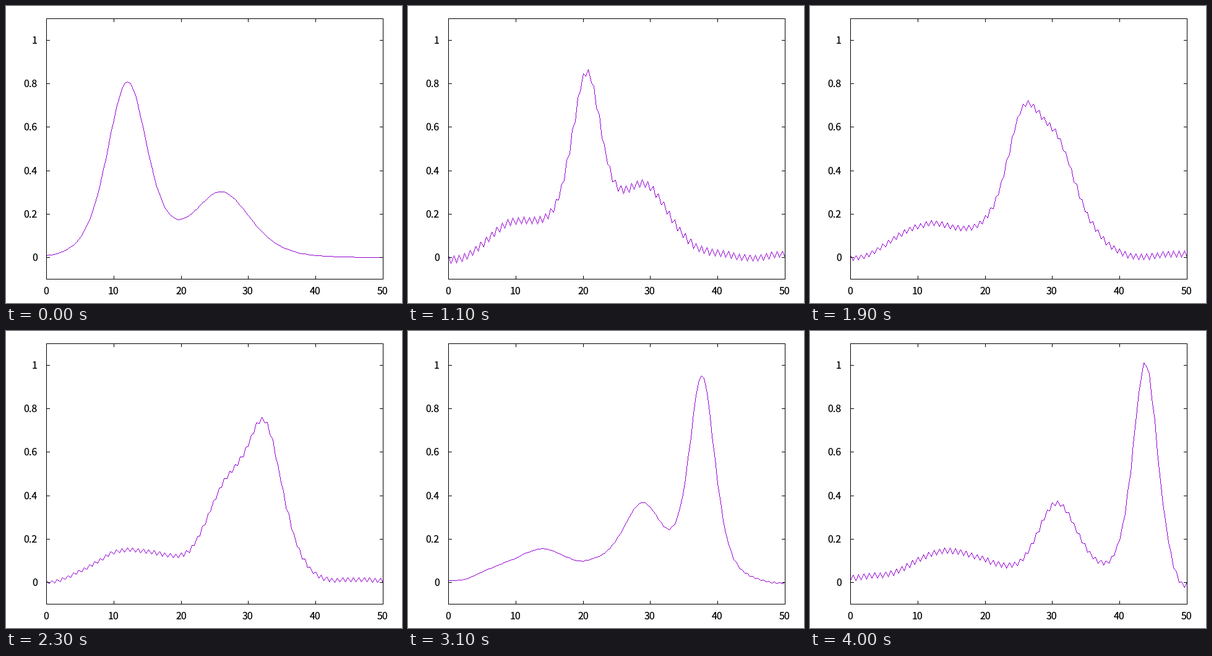
Recreate the animation shown at these times as a matplotlib script. Size 640x480 px, loop 4100 ms.

```python
"""Two solitary waves of the Korteweg-de Vries equation, solved by leapfrog."""
import numpy as np
import matplotlib.pyplot as plt
from matplotlib.animation import FuncAnimation

W, H, DPI = 640, 480, 100
LEFT, RIGHT, TOP, BOTTOM = 65, 609, 20, 441
TICK = 5
VIOLET = (0x94, 0x00, 0xD3, 255)
BLACK = (0, 0, 0, 255)

FRAMES, INTERVAL, STEPS = 41, 100, 100
CELLS, DX, DT = 125, 0.4, 0.1
EPS, MU = 0.2, 0.1

plt.rcParams["text.hinting"] = "none"


def px(x):
    return LEFT + (RIGHT - LEFT) * x / 50


def py(u):
    return BOTTOM - (BOTTOM - TOP) * (u + 0.1) / 1.2


def advance(prev, now, scale=1.0):
    """Next time level; both end values stay fixed."""
    diff = now[2:] - now[:-2]
    total = now[2:] + now[1:-1] + now[:-2]
    third = -diff
    third[1:-1] = now[4:] - now[:-4] - 2 * diff[1:-1]
    new = prev.copy()
    new[1:-1] -= scale * (EPS * DT / (3 * DX) * total * diff
                          + MU * DT / DX ** 3 * third)
    return new


def solve():
    x = np.arange(CELLS + 1) * DX
    start = (0.8 * (1 - np.tanh(3 * x / 12 - 3) ** 2)
             + 0.3 * (1 - np.tanh(4.5 * x / 26 - 4.5) ** 2))
    prev, now = start, advance(start, start, 0.5)
    shots = [start]
    for n in range(1, STEPS * (FRAMES - 1) + 1):
        if n % STEPS == 0:
            shots.append(now)
        prev, now = now, advance(prev, now)
    return x, shots


def blank():
    return np.zeros((H, W, 4), dtype=np.uint8)


def segment(canvas, x0, y0, x1, y1, color):
    """Bresenham line from the left end, or from the top end if steep."""
    dx, dy = abs(x1 - x0), abs(y1 - y0)
    if (dy > dx and y0 > y1) or (dx >= dy and x0 > x1):
        x0, y0, x1, y1 = x1, y1, x0, y0
    n = max(dx, dy, 1)
    k = np.arange(n + 1)
    cols = x0 + np.sign(x1 - x0) * ((2 * k * dx + n) // (2 * n))
    rows = y0 + np.sign(y1 - y0) * ((2 * k * dy + n) // (2 * n))
    canvas[rows, cols] = color


def trace(xs, ys):
    canvas = blank()
    xs = np.rint(xs).astype(int)
    ys = np.clip(np.rint(ys), TOP, BOTTOM).astype(int)
    for ends in zip(xs, ys, xs[1:], ys[1:]):
        segment(canvas, *ends, VIOLET)
    return canvas


def show(canvas, zorder):
    return ax.imshow(canvas, extent=(0, W, H, 0), interpolation="nearest",
                     aspect="auto", zorder=zorder)


def label(x, y, text, ha):
    ax.text(x, y, text, ha=ha, va="baseline", color="black",
            family="Noto Sans CJK JP", size=16 * 72 / DPI, zorder=3)


grid, waves = solve()

fig = plt.figure(figsize=(W / DPI, H / DPI), dpi=DPI, facecolor="white")
ax = fig.add_axes([0, 0, 1, 1])
curve = show(trace(px(grid), py(waves[0])), 1)

border = blank()
for y in (TOP, BOTTOM):
    segment(border, LEFT, y, RIGHT, y, BLACK)
for x in (LEFT, RIGHT):
    segment(border, x, TOP, x, BOTTOM, BLACK)

for value in range(0, 51, 10):
    x = round(px(value))
    segment(border, x, BOTTOM, x, BOTTOM - TICK, BLACK)
    segment(border, x, TOP, x, TOP + TICK, BLACK)
    label(x, 466, str(value), "center")

for k in range(6):
    y = round(py(k / 5))
    segment(border, LEFT, y, LEFT + TICK, y, BLACK)
    segment(border, RIGHT, y, RIGHT - TICK, y, BLACK)
    label(51, y + 6, f"{k / 5:g}", "right")

show(border, 2)
ax.set(xlim=(0, W), ylim=(H, 0))
ax.axis("off")


def draw(frame):
    curve.set_data(trace(px(grid), py(waves[frame])))
    return [curve]


anim = FuncAnimation(fig, draw, frames=FRAMES, interval=INTERVAL,
                     repeat=True, repeat_delay=0, blit=False)
plt.show()
```
